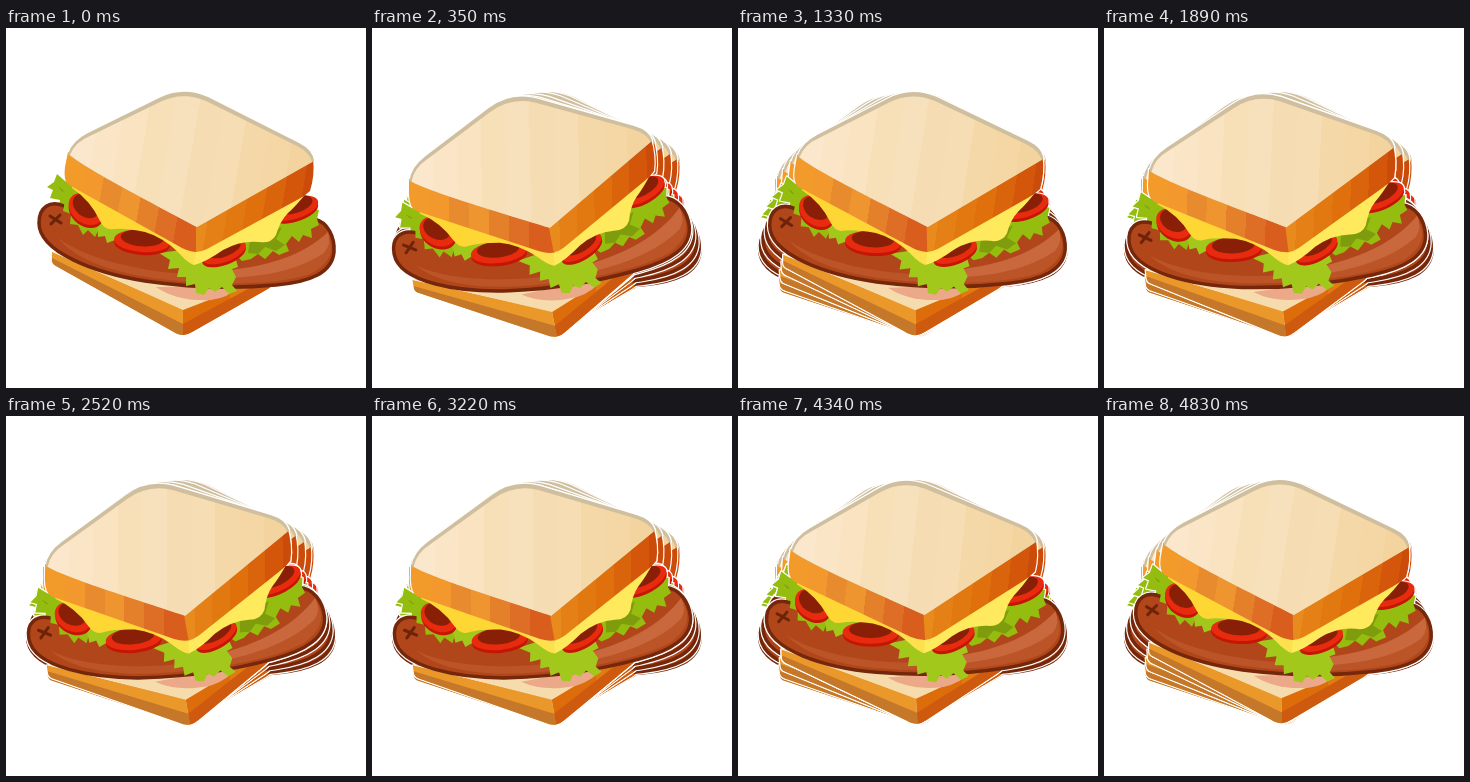
An HTML page with a canvas that plays this animation: 360 by 360 pixels, repeating every 4.9 s.

```html
<!DOCTYPE html>
<html lang="en">
<head>
<meta charset="utf-8">
<title>Wobbling sandwich</title>
<style>
html, body { margin: 0; height: 100%; overflow: hidden; background: #fff; }
canvas { display: block; width: 360px; height: 360px; }
</style>
</head>
<body>
<canvas id="stage" width="360" height="360"></canvas>
<script>
const ctx = document.getElementById('stage').getContext('2d');
const STEP = 70, CYCLE = 10, STEPS = 70, SWING = 11 * Math.PI / 180;
const PIVOT = { x: 189, y: 267 };

// Hard-edged colour bands across a line
function bands(x0, y0, x1, y1, ...colors) {
  const g = ctx.createLinearGradient(x0, y0, x1, y1);
  colors.forEach((c, i) => {
    g.addColorStop(i / colors.length, c);
    g.addColorStop((i + 1) / colors.length, c);
  });
  return g;
}

const part = (d, fill, stroke, width = 0) => ({ path: new Path2D(d), fill, stroke, width });

// A tomato slice: rim, lit edge and dark centre
function tomato(x, y, rx, ry, tilt) {
  const ring = (dy, k, fill) => {
    const path = new Path2D();
    path.ellipse(x, y + dy, rx * k, ry * k, tilt, 0, 7);
    return { path, fill, width: 0 };
  };
  return [ring(2, 1, '#c41604'), ring(-1, 1, '#e82a0e'), ring(-4, .76, '#8a1f08')];
}

const leaf = '#95bd10', leafDark = '#7f9c0c', leafLight = '#a3c81c';

const parts = [
  // bottom slice
  part('M46 224L177 281V307Q172 307 166 303L50 238Q45 236 46 224Z', '#ea982a'),
  part('M46 230L177 296V307Q172 307 166 303L50 238Q45 236 46 230Z', '#c5772a'),
  part('M177 280L268 236V250Q268 258 260 262L186 304Q181 307 177 307Z',
    bands(177, 270, 268, 285, '#dd6c0b', '#dd6c0b', '#e27a12', '#e88818')),
  part('M177 296L268 247V250Q268 258 260 262L186 304Q181 307 177 307Z', '#cd5a0e'),
  part('M48 224L180 200L266 244Q240 258 177 282Z', '#f6dcac'),
  part('M150 259Q172 274 205 272Q222 270 234 258Z', '#eba98a'),

  // leaves behind the sausage
  part('M41 159L48 154L51 146L59 153L70 158L90 185L98 205L84 203L77 207L71 196L63 194L62 184L53 181L54 172L44 170L47 162Z', leaf),
  part('M52 158Q66 168 76 197L70 187L61 179L62 172Z', leafDark),

  // sausage
  part('M33 195C33 179 44 172 58 178C105 204 170 219 220 211C255 205 285 188 308 191C322 194 329 209 328 224C326 245 304 254 270 257C226 261 180 259 139 253C89 245 33 224 33 195Z',
    '#b0461a', '#74270a', 3.5),
  part('M52 210C79 230 130 243 180 246C236 249 292 241 324 212Q330 233 304 246C266 259 194 257 140 249C104 243 69 231 52 210Z', '#bb5427'),
  part('M208 243C262 240 297 227 322 204Q326 216 318 225C291 243 254 250 211 250Q203 247 208 243Z', '#c8683c'),
  part('M44 188L55 195M54 187L45 196', null, '#6c2308', 3),

  // leaves over the sausage
  part('M53 163L72 165L94 199L89 209L82 202L77 207L72 197L64 196L65 186L57 183L59 173Z', leaf),
  part('M66 170L87 195L82 199L73 188Z', leafDark),
  part('M91 190L151 206L160 219L148 222L139 217L132 221L125 215L116 219L109 212L101 215L99 208L92 209Z', leafLight),
  part('M238 205L298 171L308 181L313 182L311 191L313 197L305 201L306 210L297 207L293 214L286 208L280 216L283 223L273 227L267 223L259 231L252 226L245 231L236 233L226 223Z', leaf),
  part('M244 213L276 199L270 211L279 217L270 223L259 219L252 226L242 225Z', leafDark),
  part('M153 225L190 220L234 220L229 228L232 239L226 241L230 249L226 257L231 263L223 266L216 259L209 264L203 260L198 267L190 265L189 256L180 258L180 249L171 249L173 240L162 241L164 232Z', leafLight),

  ...tomato(80, 182, 19, 14, .65),
  ...tomato(136, 214, 28, 11, .08),
  ...tomato(218, 225, 23, 10, -.35),
  ...tomato(288, 181, 25, 11, -.28),

  // cheese
  part('M66 150L188 210V237Q181 234 174 226Q157 209 139 204Q119 200 108 201Q99 203 94 193Q85 173 66 160Z', '#ffd735'),
  part('M188 212L301 164Q291 177 282 185Q274 193 270 207Q265 216 253 214Q235 212 217 222Q200 234 188 237Z', '#ffe95c'),
  part('M150 205L190 222L188 237Q181 234 174 226Q163 213 150 205Z', '#fce04e'),

  // top slice
  part('M62 124L191 195V224Q184 224 176 220L63 157Q57 153 59 139Z',
    bands(59, 140, 196, 164, '#f29a2a', '#f2982c', '#e88b2e', '#ee9530', '#e5802a', '#de6d26', '#d95e1e')),
  part('M190 195L307 130Q309 148 304 163Q299 168 291 172L201 221Q195 224 190 224Z',
    bands(186, 180, 308, 201, '#e98a1c', '#e58016', '#e27810', '#df700c', '#da640b', '#d3560b', '#cb4b0a')),
  part('M62 126Q66 113 82 105L153 70Q177 58 202 69L293 115Q307 122 308 133L191 199C150 177 80 141 62 126Z', '#cfbf9f'),
  part('M64 127Q69 114 84 108L154 74Q177 63 200 73L291 118Q304 125 306 134L191 199C150 177 80 141 64 127Z',
    bands(64, 110, 304, 152, '#fbe8cc', '#fae6c7', '#f9e3c1', '#f7dfb8', '#f7e1bd', '#f5dcb3', '#f6ddb4', '#f4d8a8', '#f4d7a5', '#f3d49e'))
];

function drawSandwich(step) {
  const turn = -SWING * (1 - Math.cos(step / CYCLE * 2 * Math.PI)) / 2;
  ctx.save();
  ctx.translate(PIVOT.x, PIVOT.y);
  ctx.rotate(turn);
  ctx.translate(-PIVOT.x, -PIVOT.y);
  ctx.lineJoin = ctx.lineCap = 'round';
  // white rim around the whole silhouette
  ctx.strokeStyle = '#fff';
  for (const p of parts) {
    ctx.lineWidth = p.width + 2.4;
    ctx.stroke(p.path);
  }
  for (const p of parts) {
    if (p.fill) {
      ctx.fillStyle = p.fill;
      ctx.fill(p.path);
    }
    if (p.stroke) {
      ctx.strokeStyle = p.stroke;
      ctx.lineWidth = p.width;
      ctx.stroke(p.path);
    }
  }
  ctx.restore();
}

const start = performance.now();
let shown = -1;

function frame() {
  const step = Math.floor((performance.now() - start) / STEP) % STEPS;
  if (step !== shown) {
    shown = step;
    ctx.fillStyle = '#fff';
    ctx.fillRect(0, 0, 360, 360);
    // earlier poses of the loop stay visible underneath
    for (let s = Math.max(0, step - CYCLE); s <= step; s++) drawSandwich(s);
  }
  requestAnimationFrame(frame);
}
frame();
</script>
</body>
</html>
```
